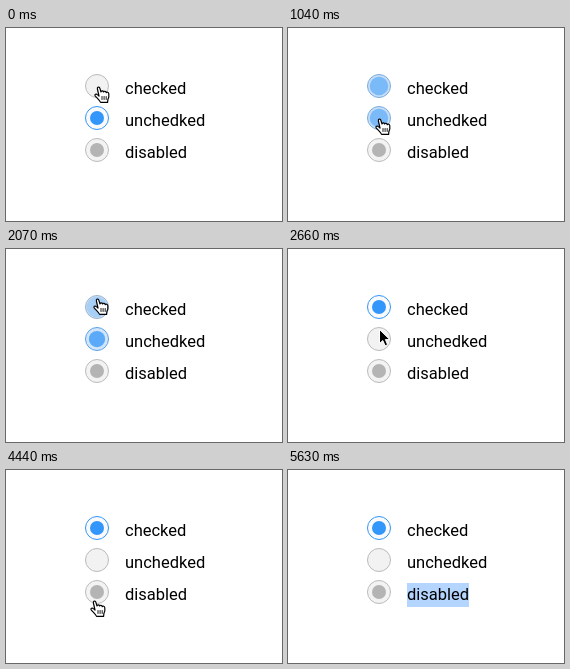
An HTML page for the animation above (6380 ms loop, 276 px wide and 193 px high).

```html
<!DOCTYPE html>
<html lang="en">
<head>
<meta charset="utf-8">
<title>Radio buttons</title>
<style>
  html, body { margin: 0; width: 100%; height: 100%; overflow: hidden; background: #fff; }
  svg { display: block; width: 276px; height: 193px; }
  text { font: 16.5px Roboto, "Liberation Sans", sans-serif; fill: #000; }
</style>
</head>
<body>
<svg viewBox="0 0 276 193">
  <rect id="selection" x="119" y="113" width="62" height="24" fill="#b4d5fe"/>
  <g id="radios"></g>
  <text x="119" y="66">checked</text>
  <text x="119" y="98">unchedked</text>
  <text x="119" y="130">disabled</text>
  <g id="hand" stroke-linejoin="round" stroke-linecap="round">
    <path fill="#fff" stroke="#000" stroke-width="1.2" d="M5 10L3.4 3C2.9 .9 5.2 .2 5.8 2.2L7 6C7 4.6 9.2 4.6 9.6 6C10 4.9 12 5 12.3 6.6C13 5.8 14.6 6.2 14.8 7.8C15.2 10 14.8 11.5 13.9 13.5L13.6 16.4H6.6C6 14.5 3 12 1.2 9.8C.2 8.4 2.2 7.4 3.4 8.6Z"/>
    <path fill="none" stroke="#000" stroke-width=".9" d="M8 10.5v3M10.1 10.5v3M12.2 10.5v3"/>
  </g>
  <path id="arrow" fill="#000" stroke="#fff" stroke-width="1" d="M.5 .5V14.6L3.8 11.5L6.1 16.8L8.6 15.7L6.4 10.6H10.8Z"/>
</svg>
<script>
const LOOP = 6380;
const NS = "http://www.w3.org/2000/svg";
const byId = id => document.getElementById(id);

// [start ms, share of the first radio's checked state]
const checks = [[0, 0], [150, .5], [300, 1], [1040, .5], [1190, 0], [2070, .25], [2220, .8], [2370, 1]];

// [start ms, cursor, x, y]
const cursors = [
  [0, "hand", 88, 58], [600, "hand", 89, 76], [740, "hand", 87, 90],
  [1630, "hand", 87, 63], [1770, "hand", 87, 49],
  [2660, "arrow", 91, 80], [2810, "arrow", 91, 108], [2960, "hand", 84, 125],
  [3410, "arrow", 117, 121], [3550, "arrow", 149, 119], [3700, "arrow", 141, 125], [3850, "arrow", 125, 130],
  [4290, "arrow", 107, 129], [4440, "hand", 84, 130],
  [5180, "arrow", 112, 145], [5330, "arrow", 165, 162], [5480, "arrow", 205, 180], [5630, "none", 0, 0]
];

const gray = [187, 187, 187], blue = [50, 150, 250], idle = [242, 242, 242], lit = [250, 250, 250];
const mix = (a, b, p) => `rgb(${a.map((v, i) => Math.round(v + (b[i] - v) * p))})`;
const current = (steps, t) => steps.findLast(step => step[0] <= t);

function set(node, attrs) {
  for (const name in attrs) node.setAttribute(name, attrs[name]);
}

function makeRadio(cy) {
  const circle = r => {
    const node = byId("radios").appendChild(document.createElementNS(NS, "circle"));
    set(node, { cx: 91, cy, r });
    return node;
  };
  return { box: circle(11.5), tint: circle(11), dot: circle(7) };
}

// The dot shrinks from the full box to its final size while it fades in.
function drawRadio({ box, tint, dot }, p) {
  set(box, { fill: mix(idle, lit, p), stroke: mix(gray, blue, p) });
  set(tint, { fill: mix(blue, blue, 0), opacity: p * (1 - p) });
  set(dot, { r: 7 + 4.5 * (1 - p), fill: mix(blue, blue, 0), opacity: p });
}

const [first, second, disabled] = [58, 90, 122].map(makeRadio);
set(disabled.box, { fill: "#f3f3f3", stroke: "#bbb" });
set(disabled.tint, { opacity: 0 });
set(disabled.dot, { fill: "#b4b4b4" });

function draw(t) {
  const checked = current(checks, t)[1];
  drawRadio(first, checked);
  drawRadio(second, 1 - checked);
  set(byId("selection"), { visibility: t >= 4890 ? "visible" : "hidden" });

  const [, kind, x, y] = current(cursors, t);
  for (const id of ["hand", "arrow"]) {
    set(byId(id), { transform: `translate(${x} ${y})`, visibility: id === kind ? "visible" : "hidden" });
  }
}

const start = performance.now();
function tick() {
  draw((performance.now() - start) % LOOP);
  requestAnimationFrame(tick);
}
tick();
</script>
</body>
</html>
```
